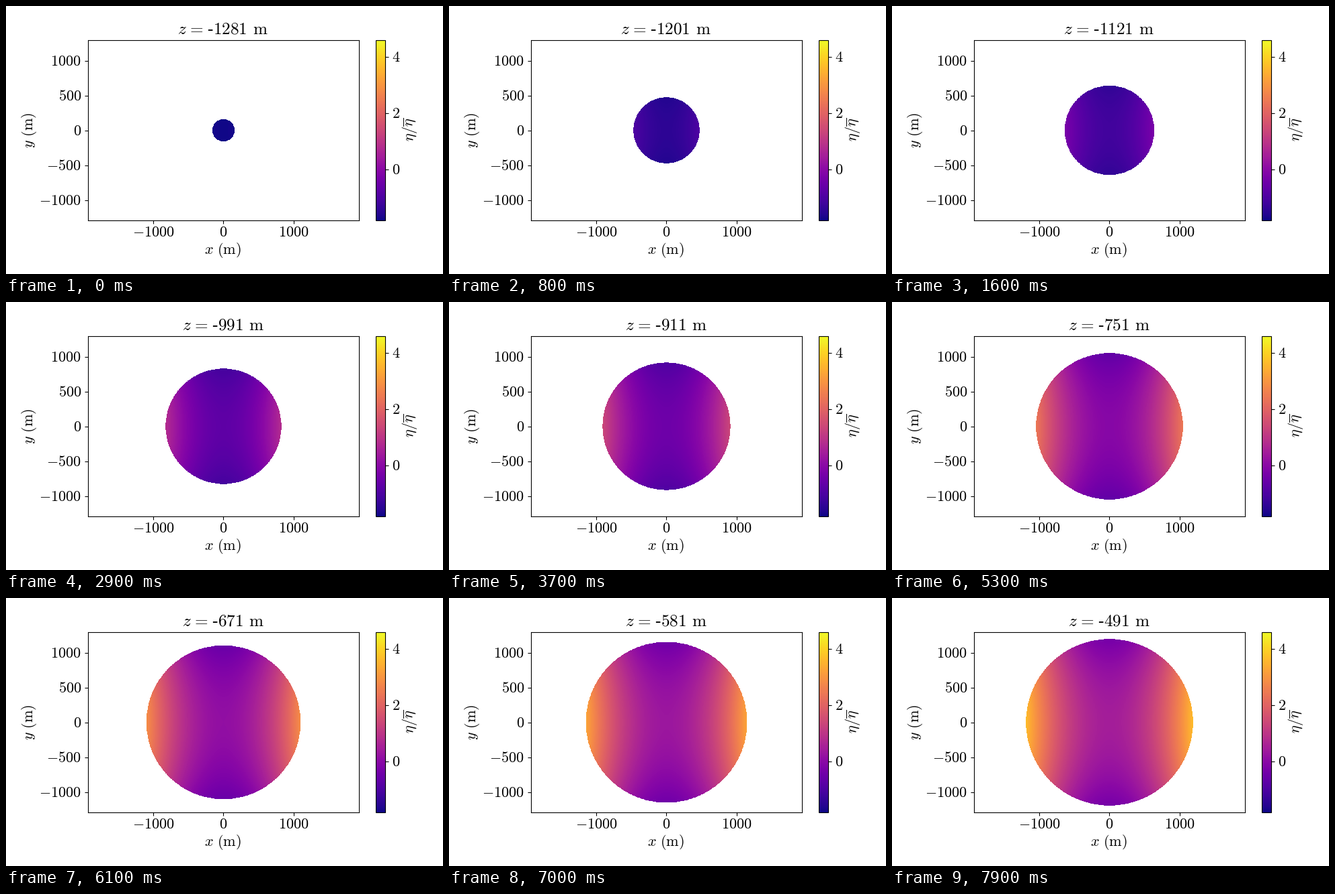
Recreate the animation shown at these times as a matplotlib script. Size 650x400 px, loop 8 s.

```python
import matplotlib.pyplot as plt
import numpy as np
from matplotlib.animation import FuncAnimation

W, H = 650, 400
FRAMES, INTERVAL = 80, 100
R, DZ = 1291, 10            # body radius and slice spacing in metres

plt.rcParams.update({
    "font.family": "Liberation Serif",
    "mathtext.fontset": "cm",
    "font.size": 16,
    "axes.linewidth": 0.8,
})

fig = plt.figure(figsize=(W / 100, H / 100), dpi=100, facecolor="white")


def add_axes(left, right, top=51.3, bottom=320.1):
    """Axes whose frame runs between the given pixel positions."""
    return fig.add_axes([left / W, 1 - bottom / H,
                         (right - left) / W, (bottom - top) / H])


def label(x, y, s, rotation=0):
    fig.text(x / W, 1 - y / H, s, ha="center", va="baseline",
             rotation=rotation, rotation_mode="anchor")


ax = add_axes(121.8, 525.1)
cax = add_axes(550, 564)

grid = np.linspace(-R, R, 700)
X2, Y2 = np.meshgrid((grid / R) ** 2, (grid / R) ** 2)


def density(z):
    """Relative density on the slice at height z, masked outside the sphere."""
    z2 = (z / R) ** 2
    eta = 0.86 + 3.74 * X2 - 0.96 * Y2 - 2.68 * z2
    return np.ma.masked_where(X2 + Y2 + z2 > 1, eta)


im = ax.imshow(density(DZ - R), origin="lower", cmap="plasma",
               vmin=-1.82, vmax=4.6, interpolation="nearest",
               extent=(-R, R, -R, R), aspect="auto")
ax.set_xlim(-1.5 * R, 1.5 * R)
ax.set_ylim(-R, R)


def ticks(values):
    return {"ticks": values, "labels": [f"${v}$" for v in values]}


ax.set_xticks(**ticks([-1000, 0, 1000]))
ax.set_yticks(**ticks([-1000, -500, 0, 500, 1000]))
cbar = fig.colorbar(im, cax=cax)
cbar.set_ticks(**ticks([0, 2, 4]))

label(322.5, 369.5, r"$x\ \mathrm{(m)}$")
label(40, 185, r"$y\ \mathrm{(m)}$", 90)
label(606, 184.5, r"$\eta/\overline{\eta}$", 90)
title = ax.set_title("", fontsize=18.2, x=0.498, pad=7)


def update(i):
    z = DZ * (i + 1) - R
    im.set_data(density(z))
    title.set_text(rf"$z\hspace{{0.1}}=\hspace{{0.1}}$-${-z}"
                   r"\hspace{0.38}\mathrm{m}$")
    return im, title


anim = FuncAnimation(fig, update, frames=FRAMES, interval=INTERVAL,
                     repeat=True, repeat_delay=0, blit=False)
plt.show()
```
